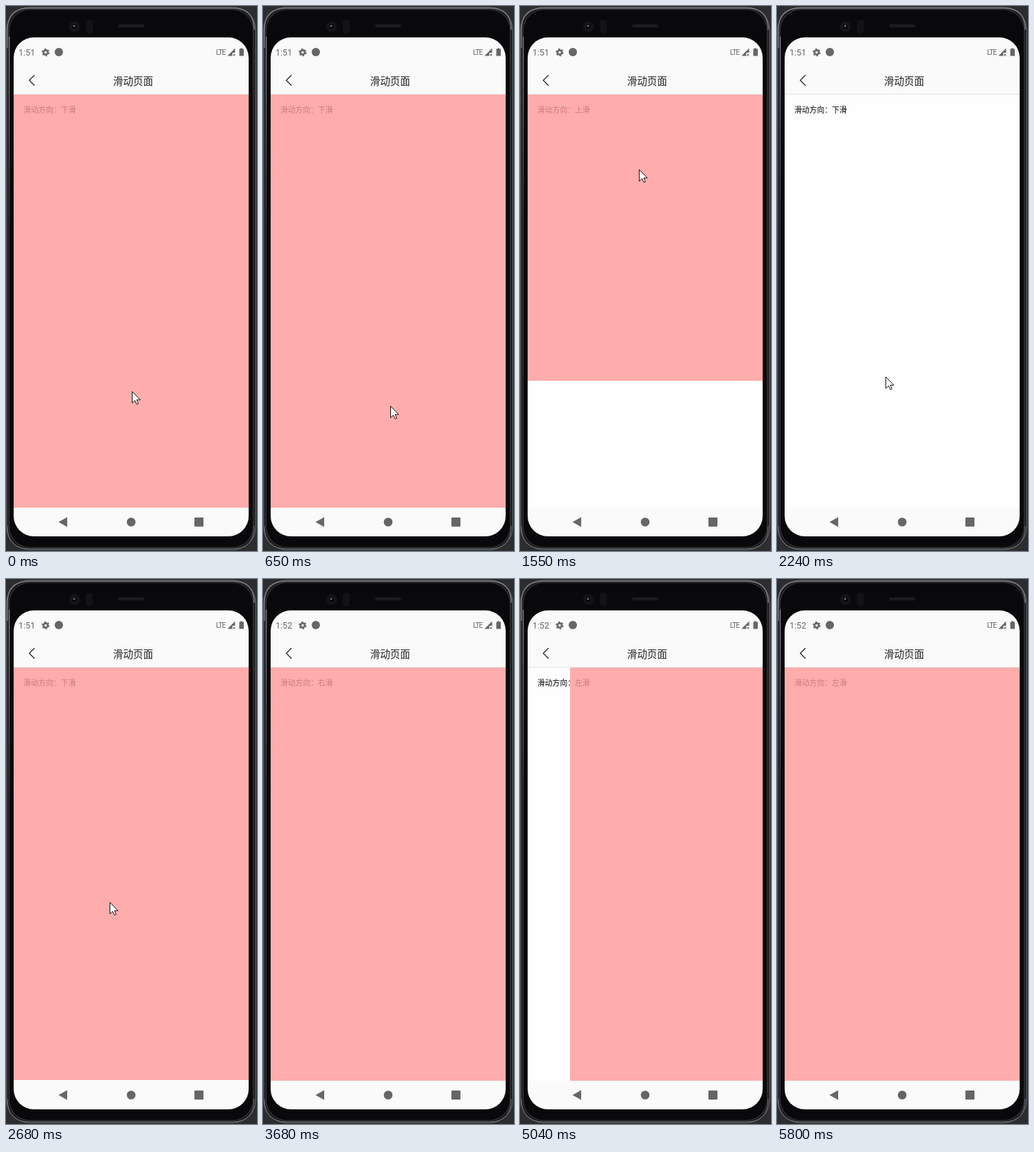
These frames come from a looping animation (361x781 px, 6160 ms). An HTML page:

```html
<!DOCTYPE html>
<html lang="zh-CN">
<head>
<meta charset="utf-8">
<style>
html, body { margin: 0; width: 100%; height: 100%; overflow: hidden; background: #2c2d2f; }
svg { display: block; width: 361px; height: 781px; overflow: hidden; }
text { font-family: "Noto Sans CJK SC", "Noto Sans CJK", sans-serif; }
.status { font-family: Roboto, sans-serif; fill: #666; }
</style>
</head>
<body>
<svg viewBox="0 0 361 781">
  <defs>
    <clipPath id="screen"><rect x="11" y="45" width="338" height="715" rx="29"/></clipPath>
    <linearGradient id="shine" x2="0" y2="1">
      <stop stop-color="#8a8a8a"/><stop offset="1" stop-color="#8a8a8a" stop-opacity="0"/>
    </linearGradient>
  </defs>

  <!-- phone body -->
  <rect x="1" y="2" width="358" height="777" rx="32" fill="#1c1d1f" stroke="#6c6d70"/>
  <rect x="4.5" y="5" width="351" height="771" rx="30" fill="#09090b" stroke="#3a3b3e"/>
  <path d="M2 60V34Q2 3 34 3H326Q357 3 357 34" fill="none" stroke="#7a7b7e" stroke-width="1.500"/>
  <path d="M2 745Q2 778 34 778H326Q357 778 357 745" fill="none" stroke="#707174"/>
  <rect x="4" y="44" width="1.300" height="276" fill="url(#shine)"/>
  <circle cx="98.500" cy="29.500" r="8" fill="#121316"/>
  <circle cx="98.500" cy="29.500" r="4.500" fill="#08090c" stroke="#222328"/>
  <circle cx="98" cy="28.500" r="1.500" fill="#6a6c73"/>
  <rect x="115" y="20" width="10" height="19" rx="4" fill="#131316"/>
  <rect x="161" y="26" width="38" height="5" rx="2" fill="#171719"/>
  <path d="M163 28.500H197" stroke="#323235" stroke-dasharray="1 1"/>

  <g clip-path="url(#screen)">
    <rect x="11" y="45" width="338" height="715" fill="#fafafa"/>
    <rect x="11" y="126" width="338" height="593" fill="#fefefe"/>
    <rect x="11" y="126" width="338" height="1" fill="#e1e1e1"/>

    <text id="clock" class="status" x="18" y="71" font-size="12.5"></text>
    <g fill="#666">
      <circle cx="57" cy="66.500" r="3.100" fill="none" stroke="#666" stroke-width="2.600"/>
      <circle cx="57" cy="66.500" r="4.900" fill="none" stroke="#666" stroke-width="1.500" stroke-dasharray="2.560 2.570"/>
      <circle cx="76" cy="66" r="6"/>
      <path d="M318.500 71.500L329.500 60.500V67H325.500V71.500Z"/>
      <path d="M326.500 68.500L329.500 71.500M329.500 68.500L326.500 71.500" stroke="#666"/>
      <path d="M337 60.500H340V61.500H342V71.500H335.500V61.500H337Z"/>
      <path d="M75.500 739.500L88 732.500V746.500Z"/>
      <circle cx="180" cy="739.500" r="6.300"/>
      <rect x="271" y="733" width="13" height="13" rx="1"/>
    </g>
    <text class="status" x="302" y="70" font-size="10.5" letter-spacing="-1">LTE</text>

    <path d="M41 99L33.500 106.500L41 114" fill="none" stroke="#222" stroke-width="1.300"/>
    <text x="154" y="113" font-size="14.400" fill="#222">滑动页面</text>
    <text id="label" x="25" y="153" font-size="10.800" fill="#000"></text>

    <rect id="panel" y="127" fill="rgb(255,152,152)" fill-opacity="0.8"/>
    <path id="glow" fill="#000" fill-opacity="0.055"/>
  </g>

  <path id="cursor" d="M.5 .5V17L4.500 13.300L7 18.700L9.300 17.800L7 12.300H12Z" fill="#fff" stroke="#111"/>
</svg>
<script>
const LOOP = 6160, LEFT = 11, TOP = 127, WIDTH = 338, HEIGHT = 592;
const [clock, label, panel, glow, cursor] =
  ['clock', 'label', 'panel', 'glow', 'cursor'].map(id => document.getElementById(id));

// time, x, y of the pointer tip
const pointer = [
  [0, 181, 552], [90, 181, 552], [650, 183, 573], [770, 183, 573],
  [1150, 171, 234], [1700, 171, 234], [2030, 156, 531], [2240, 156, 531],
  [2680, 149, 463], [2860, 149, 440], [3070, 375, 400], [3650, 375, 392],
  [4050, 255, 390], [4280, 255, 390], [4430, -15, 390],
  [5250, -15, 440], [5350, 65, 504], [5620, 365, 785]
];
const glowHeight = [[850, 0], [1150, 29], [1270, 29], [1450, 0]];
const directions = [[0, '下'], [1230, '上'], [2240, '下'], [3660, '右'], [4610, '左']];

const progress = (t, a, b) => Math.min(1, Math.max(0, (t - a) / (b - a)));

// cubic-bezier(.25, .1, .25, 1)
function ease(u) {
  let lo = 0, hi = 1, s = 0.5;
  for (let i = 0; i < 24; i++) {
    s = (lo + hi) / 2;
    if (0.75 * s * (1 - s) + s ** 3 < u) lo = s; else hi = s;
  }
  return 0.3 * s * (1 - s) ** 2 + 3 * s * s * (1 - s) + s ** 3;
}

// smooth interpolation between keys
function track(keys, t) {
  const n = keys.findIndex(k => k[0] > t);
  if (n < 1) return keys.at(n).slice(1);
  const a = keys[n - 1], b = keys[n], u = progress(t, a[0], b[0]);
  const s = u * u * (3 - 2 * u);
  return a.slice(1).map((v, i) => v + (b[i + 1] - v) * s);
}

function set(el, attrs) {
  for (const k in attrs) el.setAttribute(k, attrs[k]);
}

function draw(t) {
  const move = (a, b) => ease(progress(t, a, b));
  const shownY = t < 2240 ? 1 - move(1440, 1980) : move(2245, 2705);
  const shownX = t < 4500 ? 1 - move(3680, 4210) : move(4762, 5302);
  const w = Math.round(WIDTH * shownX), h = Math.round(HEIGHT * shownY);
  set(panel, { x: LEFT + WIDTH - w, width: w, height: h });

  const [g] = track(glowHeight, t);
  const bottom = TOP + HEIGHT, edge = bottom - g * 0.32, peak = bottom - g * 1.68;
  set(glow, { d: g > 0 ? `M11 ${bottom}V${edge}Q180 ${peak} 349 ${edge}V${bottom}Z` : '' });

  label.textContent = `滑动方向：${directions.findLast(d => d[0] <= t)[1]}滑`;
  clock.textContent = t < 3290 ? '1:51' : '1:52';
  const [x, y] = track(pointer, t);
  set(cursor, { transform: `translate(${Math.round(x)} ${Math.round(y)})` });
}

const start = performance.now();
function tick() {
  draw((performance.now() - start) % LOOP);
  requestAnimationFrame(tick);
}
tick();
</script>
</body>
</html>
```
